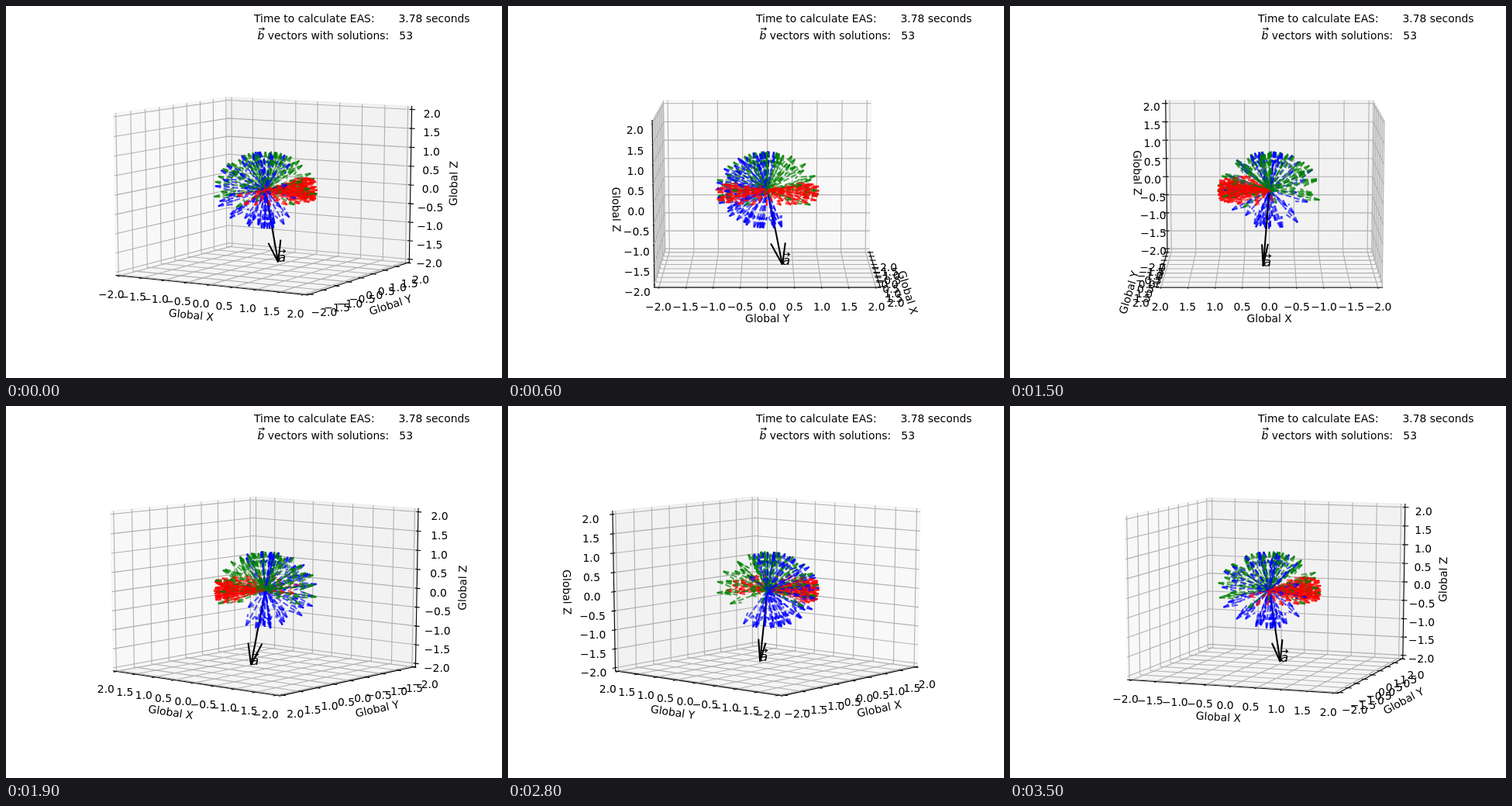
Recreate the animation shown at these times as an HTML page. Size 640 px wide and 480 px high, loop 3.6 s.

```html
<!DOCTYPE html>
<html lang="en">
<head>
<meta charset="utf-8">
<title>Rotating vector plot</title>
<style>
  html, body { margin: 0; width: 100%; height: 100%; overflow: hidden; background: #fff; }
  svg { display: block; width: 640px; height: 480px; }
  text { font: 13.889px "DejaVu Sans", sans-serif; white-space: pre; }
  .math { font-style: italic; }
  .line { fill: none; stroke: #000; stroke-width: 1.11; stroke-linecap: square; }
  .grid { fill: none; stroke: #b0b0b0; stroke-width: 1.11; stroke-linejoin: round; }
  .arrow { fill: none; stroke-width: 2.08; }
  .dashed { stroke-dasharray: 7.71 3.33; stroke-opacity: .65; }
</style>
</head>
<body>
<svg viewBox="0 0 640 480">
  <g id="plot"></g>
  <text x="320" y="21">Time to calculate EAS:       3.78 seconds</text>
  <text x="324.4" y="43" class="math">b</text>
  <path class="arrow" style="stroke:#000;stroke-width:1" d="M326 29.5h7.5m-2.5 -2l2.5 2l-2.5 2"/>
  <text x="337.8" y="43">vectors with solutions:   53</text>
</svg>
<script>
const FRAME_MS = 100, FRAMES = 36, RAD = Math.PI / 180;
const ELEV = 10 * RAD, DIST = 10;
const SCALE_X = 496 / 0.185, SCALE_Y = 369.6 / 0.185;
const ORIGIN_X = 80 + 0.095 * SCALE_X, ORIGIN_Y = 427.2 - 0.095 * SCALE_Y;

// Axis box, in data units
const EDGE = 2 + 1 / 12, DELTA = 1 / 3;
const PER_POINT = 48 / (72 * (4.96 + 3.696));
const TICK_PAD = 11.5 * PER_POINT * DELTA, LABEL_PAD = 25 * PER_POINT * DELTA;
const TICKS = Array.from({ length: 9 }, (_, i) => i / 2 - 2);
const AXES = [
  { name: "X", index: 0, across: 1, pane: 242 },
  { name: "Y", index: 1, across: 0, pane: 229.5 },
  { name: "Z", index: 2, across: 0, pane: 236 },
];

const A = [0.12, 0.29, -1.95];
const plot = document.getElementById("plot");
const { sin, cos } = Math;
const dot = (p, q) => p[0] * q[0] + p[1] * q[1] + p[2] * q[2];
const mix = (p, a, q, b) => p.map((v, i) => v * a + q[i] * b);
const replace = (p, i, v) => p.map((old, j) => j === i ? v : old);

// Tip, plus the ends of the two barbs, which lie in the vertical plane of the vector
function makeArrow(tip, color, dashed) {
  const length = Math.hypot(...tip);
  const el = Math.asin(tip[2] / length), az = Math.atan2(tip[1], tip[0]);
  const barbs = [15, -15].map(turn => {
    const e = el + turn * RAD;
    return mix(tip, 1, [cos(e) * cos(az), cos(e) * sin(az), sin(e)], -0.3 * length);
  });
  return { tip, color, dashed, ends: [[0, 0, 0], ...barbs] };
}

// Orthonormal triads: a nearly level first axis, rolled through the upper half turn
function makeArrows() {
  const arrows = [makeArrow(A, "#000", false)];
  for (let i = 0; i < 53; i++) {
    const roll = (-18 + 216 * i / 52) * RAD;
    const pitch = ((i * 2) % 5 - 2) * 6.5 * RAD;
    const spread = 2 * ((i * 0.618034 + 0.3) % 1) - 1;
    const yaw = (3 + (60 + 37 * Math.abs(cos(roll))) * spread) * RAD;
    const front = [cos(pitch) * cos(yaw), cos(pitch) * sin(yaw), sin(pitch)];
    const left = [-sin(yaw), cos(yaw), 0];
    const up = [-sin(pitch) * cos(yaw), -sin(pitch) * sin(yaw), cos(pitch)];
    arrows.push(
      makeArrow(front, "#f00", true),
      makeArrow(mix(left, cos(roll), up, sin(roll)), "#008000", true),
      makeArrow(mix(left, -sin(roll), up, cos(roll)), "#00f", true));
  }
  return arrows;
}
const ARROWS = makeArrows();

function makeCamera(azim) {
  const eye = [cos(ELEV) * cos(azim), cos(ELEV) * sin(azim), sin(ELEV)];
  const right = [-sin(azim), cos(azim), 0];
  const up = [-sin(ELEV) * cos(azim), -sin(ELEV) * sin(azim), cos(ELEV)];
  const depth = p => DIST - dot(p, eye) / 4;
  const project = p => [
    ORIGIN_X + dot(p, right) / 4 / depth(p) * SCALE_X,
    ORIGIN_Y - dot(p, up) / 4 / depth(p) * SCALE_Y,
  ];
  return { eye, depth, project };
}

function draw(azim) {
  const { eye, depth, project } = makeCamera(azim);
  const far = eye.map(v => v < 0 ? EDGE : -EDGE);
  const flip = (p, i) => replace(p, i, -p[i]);
  const path = points => "M" + points.map(p => project(p).map(v => v.toFixed(2))).join("L");
  const stroke = (cls, points, extra = "") => `<path class="${cls}" d="${path(points)}" ${extra}/>`;
  const outward = (p, axis, pad) => p.map((v, i) => i === axis ? v : v + Math.sign(v) * pad);
  let out = "";

  for (const { index, pane } of AXES) {
    const j = (index + 1) % 3, k = (index + 2) % 3;
    const corners = [far, flip(far, j), flip(flip(far, j), k), flip(far, k)];
    const color = `rgb(${pane},${pane},${pane})`;
    out += stroke("", corners, `fill="${color}" fill-opacity=".5" stroke="${color}" stroke-opacity=".5" stroke-width="1.39"`);
  }

  for (const { name, index, across } of AXES) {
    const start = flip(far, across), end = flip(start, index);
    out += stroke("line", [start, end]);

    const [x1, y1] = project(start), [x2, y2] = project(end);
    let angle = (Math.atan2(y1 - y2, x2 - x1) / RAD + 360) % 180;
    if (angle > 90) angle -= 180;
    const [cx, cy] = project(outward(replace(start, index, 0), index, LABEL_PAD));
    out += `<text text-anchor="middle" y="4" transform="translate(${cx} ${cy}) rotate(${-angle})">Global ${name}</text>`;

    for (const t of TICKS) {
      const corner = replace(far, index, t);
      out += stroke("grid", [flip(corner, (index + 1) % 3), corner, flip(corner, (index + 2) % 3)]);
    }
    const sign = Math.sign(far[across]) * DELTA;
    for (const t of TICKS) {
      const at = replace(start, index, t);
      out += stroke("line", [0.1, -0.2].map(f => replace(at, across, at[across] + f * sign)));
      const [x, y] = project(outward(at, index, TICK_PAD).map((v, i) => i === index ? t : v));
      const label = t.toFixed(1).replace("-", "\u2212");
      out += `<text text-anchor="middle" x="${x.toFixed(1)}" y="${Math.round(y + 11)}">${label}</text>`;
    }
  }

  const [ax, ay] = project(A);
  out += `<g transform="translate(${Math.round(ax)} ${Math.round(ay)})">` +
    `<text class="math" style="font-size:16.667px">a</text>` +
    `<path class="arrow" style="stroke:#000;stroke-width:1.1" d="M1.5 -13.5h8m-2.8 -2.2l2.8 2.2l-2.8 2.2"/></g>`;

  // Painter's order by the nearest point of each arrow
  const nearest = a => Math.min(...[a.tip, ...a.ends].map(depth));
  const sorted = ARROWS.map(a => [nearest(a), a]).sort((p, q) => q[0] - p[0]);
  for (const [, { tip, ends, color, dashed }] of sorted)
    for (const end of ends)
      out += stroke(dashed ? "arrow dashed" : "arrow", [tip, end], `stroke="${color}"`);

  plot.innerHTML = out;
}

let shown = -1;
function tick() {
  const frame = Math.floor(performance.now() / FRAME_MS) % FRAMES;
  if (frame !== shown) {
    shown = frame;
    draw((-60 + 10 * frame) * Math.PI / 180);
  }
  requestAnimationFrame(tick);
}
tick();
</script>
</body>
</html>
```
